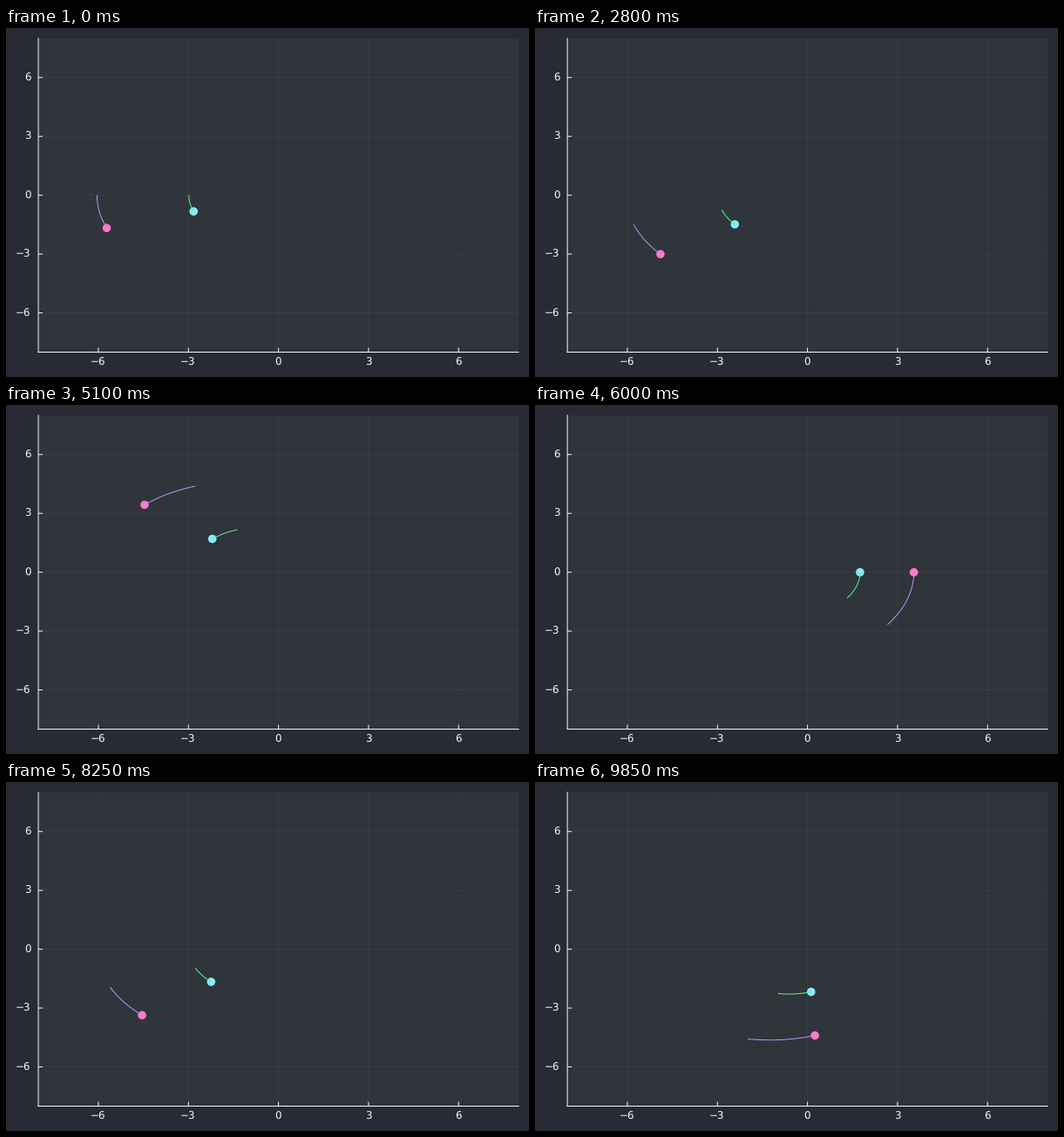
A matplotlib script for the animation above (9900 ms loop, 600 px wide and 400 px high).

```python
import numpy as np
import matplotlib.pyplot as plt
from matplotlib.animation import FuncAnimation
from matplotlib.patches import Ellipse

W, H, DPI = 600, 400, 100
PX = 72 / DPI  # points per pixel
FRAMES, INTERVAL = 198, 50

BACK, INSIDE, FORE = "#282a36", "#30343b", "#f8f8f2"
CYAN, PINK, GREEN, PURPLE = "#8be9fd", "#ff79c6", "#50fa7b", "#bd93f9"

# Plot area in pixels, y downwards
LEFT, RIGHT, TOP, BOTTOM = 37.1, 588.1, 11.8, 371.5
LIMIT = 8
TICKS = range(-6, 7, 3)
UNIT_X = 2 * LIMIT / (RIGHT - LEFT)  # data units per pixel
UNIT_Y = 2 * LIMIT / (BOTTOM - TOP)
TICK_SIZE, DOT_SIZE = 5, 9.6

# Kepler ellipse with its focus at the origin, starting at the far end
SEMI_MAJOR, ECC = 4.795, 0.2607
SEMI_MINOR = SEMI_MAJOR * np.sqrt(1 - ECC**2)
INNER_SCALE = 0.494
STEP = 0.23175  # mean anomaly per frame
TRAIL = 2       # trail length in frames

# Keep lines at their exact subpixel places
plt.rcParams["path.snap"] = False
plt.rcParams["text.hinting"] = "none"


def orbit(mean):
    """Position for mean anomalies counted from the far end."""
    ecc_anomaly = mean.copy()
    for _ in range(8):
        error = ecc_anomaly + ECC * np.sin(ecc_anomaly) - mean
        ecc_anomaly -= error / (1 + ECC * np.cos(ecc_anomaly))
    x = -SEMI_MAJOR * (np.cos(ecc_anomaly) + ECC)
    y = -SEMI_MINOR * np.sin(ecc_anomaly)
    return x, y


def label(x, y, value, align):
    fig.text(x / W, 1 - y / H, str(value).replace("-", "\u2212"), color=FORE,
             fontsize=11.85 * PX, family="DejaVu Sans", ha=align,
             va="baseline")


fig = plt.figure(figsize=(W / DPI, H / DPI), dpi=DPI, facecolor=BACK)
ax = fig.add_axes([LEFT / W, 1 - BOTTOM / H,
                   (RIGHT - LEFT) / W, (BOTTOM - TOP) / H], facecolor=INSIDE)
ax.set(xlim=(-LIMIT, LIMIT), ylim=(-LIMIT, LIMIT), xticks=TICKS, yticks=TICKS)
ax.set_axisbelow(True)
ax.grid(color=FORE, alpha=0.05, linewidth=PX)
ax.tick_params(length=0, labelbottom=False, labelleft=False)
ax.spines[["top", "right"]].set_visible(False)
for side in ("left", "bottom"):
    ax.spines[side].set(color=FORE, linewidth=PX)

tick_style = dict(color=FORE, linewidth=PX, solid_capstyle="butt")
for value in TICKS:
    ax.plot([value] * 2, [-LIMIT, -LIMIT + TICK_SIZE * UNIT_Y], **tick_style)
    ax.plot([-LIMIT, -LIMIT + TICK_SIZE * UNIT_X], [value] * 2, **tick_style)
    label(LEFT + (value + LIMIT) / UNIT_X - 0.4, 386.6, value, "center")
    label(28.3, BOTTOM - (value + LIMIT) / UNIT_Y + 4, value, "right")


def body(scale, trail_color, dot_color):
    dot = Ellipse((0, 0), DOT_SIZE * UNIT_X, DOT_SIZE * UNIT_Y,
                  facecolor=dot_color, linewidth=0, zorder=3)
    ax.add_patch(dot)
    trail, = ax.plot([], [], color=trail_color, linewidth=PX, zorder=4,
                     solid_capstyle="butt")
    return scale, trail, dot


bodies = [body(INNER_SCALE, GREEN, CYAN), body(1, PURPLE, PINK)]


def update(frame):
    x, y = orbit(STEP * np.linspace(frame, frame + TRAIL, 21))
    for scale, trail, dot in bodies:
        trail.set_data(scale * x, scale * y)
        dot.set_center((scale * x[-1], scale * y[-1]))
    return [artist for _, *pair in bodies for artist in pair]


anim = FuncAnimation(fig, update, frames=FRAMES, interval=INTERVAL,
                     repeat=True, repeat_delay=0, blit=False)
plt.show()
```
